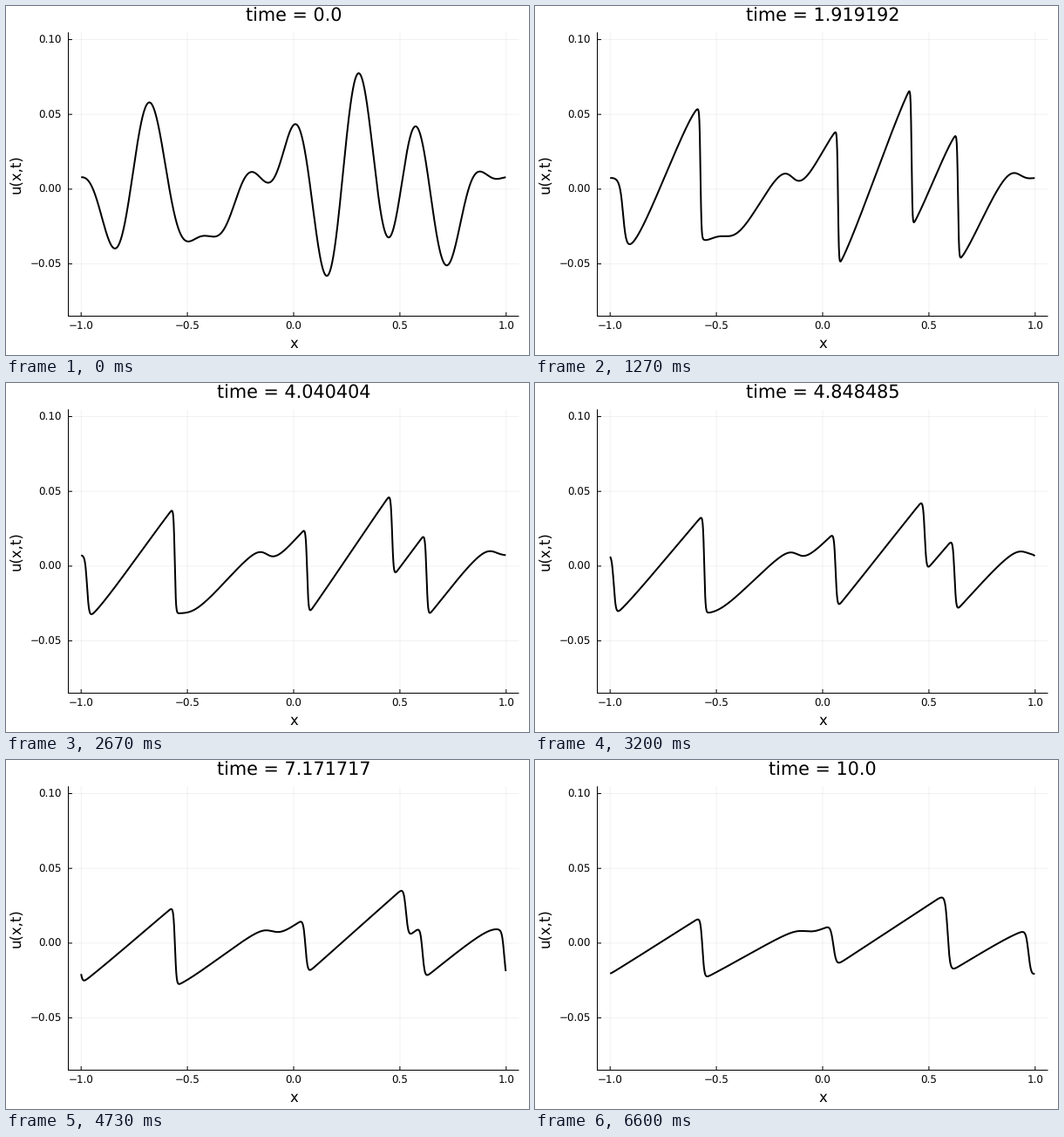
Write a matplotlib script that moves like this. It is 600 px wide and 400 px high and loops after 6.67 s.

```python
import numpy as np
import matplotlib.pyplot as plt
from matplotlib.animation import FuncAnimation

# Viscous Burgers equation on a periodic domain, solved spectrally.
W, H, DPI = 600, 400, 100
STEPS, T_END = 100, 10.0
N, NU, SUBSTEPS = 1024, 1e-4, 10
MODES = 12

# 100 time steps spread over one loop of 290 short ticks
LOOP, TICK = 6670, 23

plt.rcParams["font.family"] = "DejaVu Sans"
plt.rcParams["text.hinting"] = "none"

# Turning points (x, u) of the initial wave
TURNS = np.array([
    (-0.998, 0.0080), (-0.841, -0.0397), (-0.679, 0.0580), (-0.496, -0.0350),
    (-0.418, -0.0312), (-0.377, -0.0318), (-0.197, 0.0115), (-0.119, 0.0043),
    (0.008, 0.0435), (0.156, -0.0580), (0.306, 0.0775), (0.447, -0.0323),
    (0.574, 0.0420), (0.720, -0.0510), (0.878, 0.0118), (0.956, 0.0068),
])


def basis(x, slope=False):
    k = np.pi * np.arange(1, MODES + 1)
    kx = np.outer(x, k)
    if slope:
        return np.hstack([np.zeros((len(x), 1)), -k * np.sin(kx), k * np.cos(kx)])
    return np.hstack([np.ones((len(x), 1)), np.cos(kx), np.sin(kx)])


def initial_wave(x):
    """Smooth trigonometric fit through the turning points."""
    px, pu = TURNS.T
    k = np.arange(1, MODES + 1)
    prior = 0.02 * np.exp(-(k / 8) ** 2)
    prior = np.concatenate([[0.02], prior, prior])
    a = np.vstack([basis(px) / 4e-4, basis(px, True) / 0.04, np.diag(1 / prior)])
    b = np.concatenate([pu / 4e-4, np.zeros(len(px) + len(prior))])
    coef = np.linalg.lstsq(a, b, rcond=None)[0]
    return basis(x) @ coef


def solve(u0):
    """Integrating-factor RK4; returns one row per time step."""
    k = np.pi * np.arange(N // 2 + 1)
    dt = T_END / (STEPS - 1) / SUBSTEPS
    half = np.exp(-NU * k ** 2 * dt / 2)
    full = half ** 2
    keep = k < k[-1] * 0.8

    def rate(v):
        return -0.5j * k * keep * np.fft.rfft(np.fft.irfft(v, N) ** 2)

    v = np.fft.rfft(u0)
    rows = [u0]
    for _ in range(STEPS - 1):
        for _ in range(SUBSTEPS):
            a = rate(v)
            b = rate(half * (v + dt / 2 * a))
            c = rate(half * v + dt / 2 * b)
            d = rate(full * v + dt * half * c)
            v = full * v + dt / 6 * (full * a + 2 * half * (b + c) + d)
        rows.append(np.fft.irfft(v, N))
    return np.array(rows)


def to_px(x):
    return 330 + 243.8 * np.asarray(x)


def to_py(u):
    return 209.9 - 1714 * np.asarray(u)


x = -1 + 2 * np.arange(N) / N
waves = solve(initial_wave(x))

fig = plt.figure(figsize=(W / DPI, H / DPI), dpi=DPI, facecolor="white")
ax = fig.add_axes([0, 0, 1, 1])
ax.set_xlim(0, W)
ax.set_ylim(H, 0)
ax.axis("off")

LEFT, RIGHT, TOP, BOTTOM = 71.5, 588.5, 30.2, 355.5


def rule(xs, ys, alpha=1):
    ax.plot(xs, ys, color="black", lw=0.72, alpha=alpha, snap=False,
            solid_capstyle="butt")


def label(px, py, text, size, ha="center", **style):
    return ax.text(px, py, text, fontsize=size * 72 / DPI, color="black",
                   ha=ha, va="baseline", **style)


def number(value, digits):
    return f"{value:.{digits}f}".replace("-", "\u2212")


for value in (-1, -0.5, 0, 0.5, 1):
    p = to_px(value)
    rule([p, p], [TOP, BOTTOM], alpha=0.055)
    rule([p, p], [BOTTOM, BOTTOM - 4.5])
    label(p, 371, number(value, 1), 11.9)

for value in (-0.05, 0, 0.05, 0.1):
    p = to_py(value)
    rule([LEFT, RIGHT], [p, p], alpha=0.055)
    rule([LEFT, LEFT + 4.5], [p, p])
    label(64, p + 4.4, number(value, 2), 11.9, ha="right")

rule([LEFT, LEFT], [TOP, BOTTOM + 0.5])
rule([LEFT - 0.5, RIGHT], [BOTTOM, BOTTOM])
label(330, 391.7, "x", 16.5)
label(17, 193, "u(x,t)", 16.5, rotation=90, rotation_mode="anchor")

title = label(330, 18, "", 20.8)
curve, = ax.plot([], [], color="black", lw=1.44, solid_joinstyle="round",
                 solid_capstyle="butt", zorder=5)


def draw(i):
    # A step appears in the tick during which it falls due
    step = min(int((i + 1.1) * TICK * STEPS / LOOP), STEPS - 1)
    curve.set_data(to_px(x), to_py(waves[step]))
    title.set_text(f"time = {np.float32(T_END * step / (STEPS - 1))!s}")
    return curve, title


anim = FuncAnimation(fig, draw, frames=LOOP // TICK, interval=TICK, repeat=True,
                     repeat_delay=0, blit=False)
plt.show()
```
